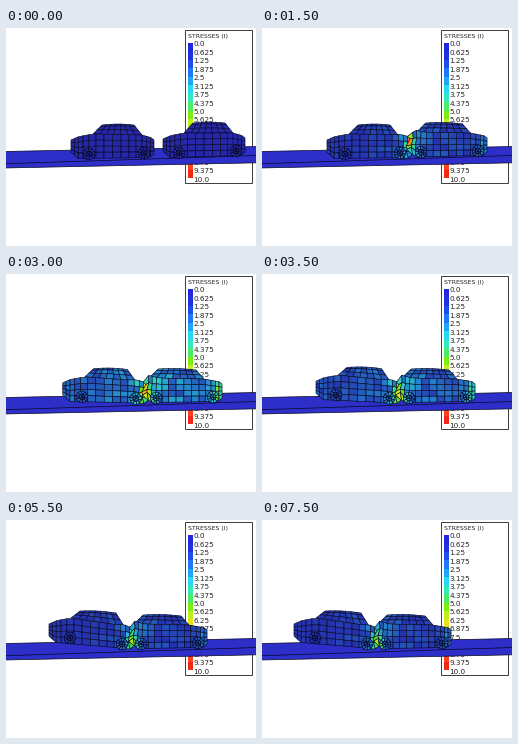
These frames come from a looping animation (250x218 px, 8000 ms). A matplotlib script:

```python
import numpy as np
import matplotlib.pyplot as plt
from matplotlib.animation import FuncAnimation
from matplotlib.collections import PolyCollection
from matplotlib.colors import LinearSegmentedColormap
from matplotlib.patches import Polygon, Rectangle

W, H, DPI = 250, 218, 100
FRAMES, STEP = 16, 500
PX = 72 / DPI
INK = (0.02, 0.03, 0.13)
GREY = (0.15, 0.15, 0.15)

scale = LinearSegmentedColormap.from_list("stress", [
    (0, "#2222d8"), (.12, "#2034e1"), (.25, "#1e8cfa"), (.36, "#28e6f0"),
    (.45, "#3ceb8c"), (.52, "#6eeb14"), (.63, "#e1f01e"), (.75, "#ffb414"),
    (.9, "#ff461e"), (1, "#eb1e14")])

# Seconds and pixels per second
HIT = 1.0
PUSH = 1.5
FAST, SLOW, DRAG = 9.3, 6.0, 5.5


def ease(t, start, length):
    u = np.clip((t - start) / length, 0, 1)
    return u * u * (3 - 2 * u)


def struck_car(t):
    """Pushed backwards while its rear end rises."""
    dx, lift = -DRAG * max(t - PUSH, 0), ease(t, PUSH, 3.5)
    return dict(left=65 + dx, right=148 + dx,
                wheels=[(83 + dx + 3 * lift, 126 - 8 * lift), (138 + dx, 125 - lift)],
                roof=[(96 + dx, 97 - 6 * lift), (128 + dx + 4 * lift, 97 - 4 * lift)])


def striking_car(t, contact):
    """Drives in fast, then slows; its nose stops at the contact."""
    dx = -FAST * min(t, PUSH) - SLOW * max(t - PUSH, 0)
    lean = ease(t, HIT - .2, 1)
    return dict(left=max(157 + dx, contact), right=239 + dx,
                wheels=[(173 + dx, 125 - lean), (230 + dx, 123)],
                roof=[(187 + dx - 12 * lean, 95), (219 + dx - 6 * lean, 95 + lean)])


def quads(grid):
    """Split a rows x cols x 2 node grid into cells."""
    return [np.array([grid[r, c], grid[r, c + 1], grid[r + 1, c + 1], grid[r + 1, c]])
            for r in range(grid.shape[0] - 1) for c in range(grid.shape[1] - 1)]


def wheel(x, y, r=6.0, n=10):
    a = np.linspace(0, 2 * np.pi, n + 1) + .2
    spoke = np.stack([np.cos(a), np.sin(a)], -1)
    rim, hub = [x, y] + r * spoke, [x, y] + r * .5 * spoke
    ring = [np.array([rim[i], rim[i + 1], hub[i + 1], hub[i]]) for i in range(n)]
    fan = [np.array([hub[i], hub[i + 2], [x, y]]) for i in range(0, n, 2)]
    return ring + fan


# Columns are denser towards both ends
u = np.linspace(0, 1, 15)
COLS = u - .45 * np.sin(2 * np.pi * u) / (2 * np.pi)
ROWS = np.linspace(0, 1, 5)


def car_mesh(car, contact, crush, noise):
    left, right = car["left"], car["right"]
    (lx, ly), (rx, ry) = car["wheels"]
    (ax0, ay0), (ax1, ay1) = car["roof"]
    px, qx = max(left + 1, ax0 - 9), min(right - 2, ax1 + 8)

    # Cabin
    s, f = np.meshgrid(np.linspace(0, 1, 8), [0, .18, .55, 1])
    top_x, top_y = ax0 + s * (ax1 - ax0), ay0 + s * (ay1 - ay0) - np.sin(np.pi * s)
    low_x, low_y = px + s * (qx - px), ly - 20 + s * (ry - ly + 2)
    cabin = np.stack([top_x + f * (low_x - top_x), top_y + f * (low_y - top_y)], -1)

    # Body between the belt line and the sill
    xs = left + COLS * (right - left)
    belt = np.interp(xs, [left, left + min(8, (px - left) / 2), px, qx, right - 1.5, right],
                     [ly - 14, ly - 17.5, ly - 20, ry - 18, ry - 15, ry - 13])
    sill = np.interp(xs, [left, left + 7, right - 4, right],
                     [ly - 2, ly + 4.5, ry + 4.5, ry + 1])
    near = crush * np.exp(-np.abs(xs - contact) / 6)
    body = np.stack([np.tile(xs, (len(ROWS), 1)),
                     belt + ROWS[:, None] * (sill - belt)], -1)
    body += noise * near[None, :, None] * 2.4
    body[..., 0] += np.sign(contact - (left + right) / 2) * 2 * near
    body[0, :, 1] -= 4 * near
    return quads(cabin) + quads(body) + wheel(lx, ly) + wheel(rx, ry)


def stress(cells, t, contact, crush, grain):
    mid = np.array([c.mean(0) for c in cells])
    d = np.abs(mid[:, 0] - contact)
    grain = grain[:len(cells)]
    wave = np.exp(-((t - 2.9) / .9) ** 2)
    hot_y = 113 + 11 * ease(t, PUSH, 2.5)
    hot = np.exp(-(d / 4) ** 2 - ((mid[:, 1] - hot_y) / 8) ** 2)
    return crush * ((.11 + .1 * wave) * (.7 + .6 * grain)
                    + .2 * np.exp(-d / 12) * (.6 + .8 * grain)
                    + .36 * hot * (.4 + grain))


def tail_stress(cells, t, crush, x):
    mid = np.array([c.mean(0)[0] for c in cells])
    wave = np.exp(-((t - 2.9) / .9) ** 2)
    return crush * (.02 + (.14 + .18 * wave) * np.exp(-np.abs(mid - x) / 5))


def shade(v):
    """Low stress is muted by the lighting, peaks stay bright."""
    v = np.clip(v, 0, 1)
    lit = (.72 + .25 * np.clip((v - .2) / .35, 0, 1))[:, None]
    return scale(v)[:, :3] * lit + .1 * (1 - lit) * 2


rng = np.random.default_rng(4)
noises = rng.uniform(-1, 1, (2, len(ROWS), len(COLS), 2))
grains = rng.uniform(0, 1, (2, 200))

fig = plt.figure(figsize=(W / DPI, H / DPI), dpi=DPI, facecolor="white")
ax = fig.add_axes([0, 0, 1, 1])
ax.set(xlim=(0, W), ylim=(H, 0))
ax.axis("off")

# Legend
ax.add_patch(Rectangle((179.5, 2.5), 67, 153, fc="white", ec="#404040", lw=PX, snap=False))
ax.text(181.5, 8, "STRESSES (I)", size=6.3 * PX, family="DejaVu Sans",
        color=GREY, va="center_baseline")
for i in range(17):
    y = 16 + i * 8.44
    if i < 16:
        ax.add_patch(Rectangle((182, y - 1), 5, 8.6, fc=scale((i + .5) / 16), lw=0))
    ax.text(187.3, y, str(i * .625), size=7.3 * PX, family="DejaVu Sans",
            color=GREY, va="center_baseline")

# Road
ax.add_patch(Polygon([(-2, 123.5), (252, 118.5), (252, 134.8), (-2, 140)],
                     fc=(.18, .18, .79), ec=INK, lw=.7 * PX, zorder=3))
ax.plot([0, W], [135.7, 127.5], color=INK, lw=.7 * PX, zorder=3)

mesh = PolyCollection([], edgecolors=[INK], linewidths=.6 * PX, zorder=4)
ax.add_collection(mesh, autolim=False)


def draw(i):
    t = i * STEP / 1000
    crush = ease(t, HIT - .4, .9)
    struck = struck_car(t)
    contact = struck["right"]
    striking = striking_car(t, contact)
    back, front = [car_mesh(car, contact, crush, n)
                   for car, n in zip((struck, striking), noises)]
    v_back = stress(back, t, contact, crush, grains[0])
    v_front = (stress(front, t, contact, crush, grains[1])
               + tail_stress(front, t, crush, striking["right"] - 4))
    mesh.set_verts(back + front)
    mesh.set_facecolor(shade(np.concatenate([v_back, v_front])))
    return [mesh]


anim = FuncAnimation(fig, draw, frames=FRAMES, interval=STEP, repeat=True,
                     repeat_delay=0, blit=False)
plt.show()
```
